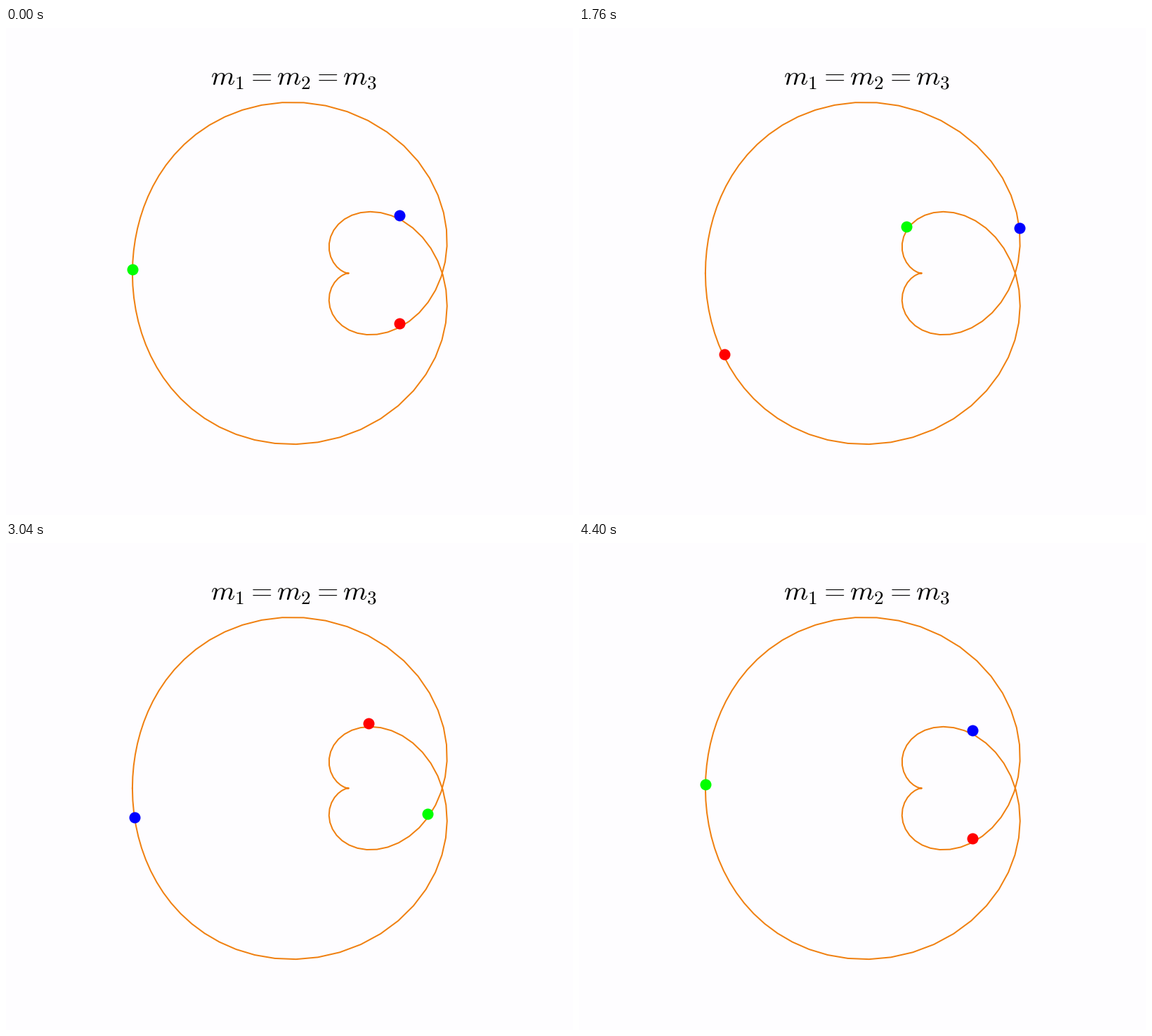
These frames come from a looping animation (807x694 px, 4.44 s). A matplotlib script:

```python
import numpy as np
import matplotlib.pyplot as plt
from matplotlib.animation import FuncAnimation

W, H, DPI = 807, 694, 64
PT = 72 / DPI                      # points per pixel
FRAMES, STEP = 111, 40
LEAD = 26                          # head start gained over the first steps
PERIOD = (FRAMES - 1) * STEP + LEAD
CENTER = np.array([433.4, 344.2])  # centre of mass
TRAIL_SHIFT = np.array([0.3, 5.3])
GM = 36.0                          # gravity times the common mass
REACH = 253.8                      # farthest distance from the centre
N = 240                            # integration steps per sixth of the orbit


def start(h, u, w):
    """Isosceles pose: one body far left, the other two mirrored."""
    pos = np.array([[-REACH, 0], [REACH / 2, -h], [REACH / 2, h]])
    vel = np.array([[0, 2 * w], [-u, -w], [u, -w]])
    return np.stack([pos, vel])


def rate(state):
    pos, vel = state
    gap = pos[None] - pos[:, None]
    dist = np.sqrt((gap**2).sum(-1)) + np.eye(3)
    return np.stack([vel, GM * (gap / dist[..., None]**3).sum(1)])


def integrate(state, span, steps):
    """Runge-Kutta integration of the three bodies."""
    dt = span / steps
    states = [state]
    for _ in range(steps):
        k1 = rate(state)
        k2 = rate(state + dt / 2 * k1)
        k3 = rate(state + dt / 2 * k2)
        k4 = rate(state + dt * k3)
        state = state + dt / 6 * (k1 + 2 * k2 + 2 * k3 + k4)
        states.append(state)
    return np.array(states)


def mismatch(p):
    """Distance from the mirrored pose after a sixth of the orbit."""
    pos, vel = integrate(start(*p[:3]), p[3], N)[-1]
    a, b, c = range(3)
    return np.array([pos[b, 1], pos[a, 0] - pos[c, 0],
                     500 * vel[b, 0], 500 * (vel[a, 1] - vel[c, 1])])


def find_orbit():
    """Newton's method for the orbit that all three bodies share."""
    p = np.array([77.2, 0.345, 0.188, 1000.0])
    for _ in range(7):
        miss = mismatch(p)
        nudges = np.diag(p * 1e-5)
        jac = np.column_stack([(mismatch(p + d) - miss) / d.sum() for d in nudges])
        p = p - np.linalg.solve(jac, miss)
    third = integrate(start(*p[:3]), 2 * p[3], 2 * N)[:-1, 0]
    return np.concatenate([third[:, body] for body in range(3)])


PATH = find_orbit()
GRID = np.arange(len(PATH)) / N


def orbit(s):
    """Position at phase s; time runs slower when two bodies are close."""
    f = 6 * np.atleast_1d(s) / PERIOD
    t = f - 0.095 * np.sin(np.pi * f) + 0.015 * np.sin(2 * np.pi * f)
    xy = [np.interp(t, GRID, axis, period=6) for axis in PATH.T]
    return CENTER + np.column_stack(xy)


def phase(i):
    return i * STEP + LEAD * np.minimum(1, i / 8)


fig = plt.figure(figsize=(W / DPI, H / DPI), dpi=DPI, facecolor="#fefdff")
ax = fig.add_axes([0, 0, 1, 1])
ax.set_xlim(0, W)
ax.set_ylim(H, 0)
ax.axis("off")

trail = orbit(phase(np.arange(FRAMES))) + TRAIL_SHIFT
ax.plot(*trail.T, color="#f08010", lw=2 * PT, solid_joinstyle="round")

ax.text(410, 82, "$m_1=m_2=m_3$", fontsize=39 * PT, color="black",
        math_fontfamily="cm", ha="center", va="baseline")

dots = [ax.plot([], [], "o", ms=16 * PT, mew=0, color=c, zorder=3)[0]
        for c in ("#ff0000", "#0000ff", "#00ff00")]


def draw(i):
    for k, dot in enumerate(dots, 1):
        x, y = orbit(phase(i) - k * PERIOD / 3)[0]
        dot.set_data([x], [y])
    return dots


anim = FuncAnimation(fig, draw, frames=FRAMES, interval=STEP,
                     repeat=True, repeat_delay=0, blit=False)
plt.show()
```
